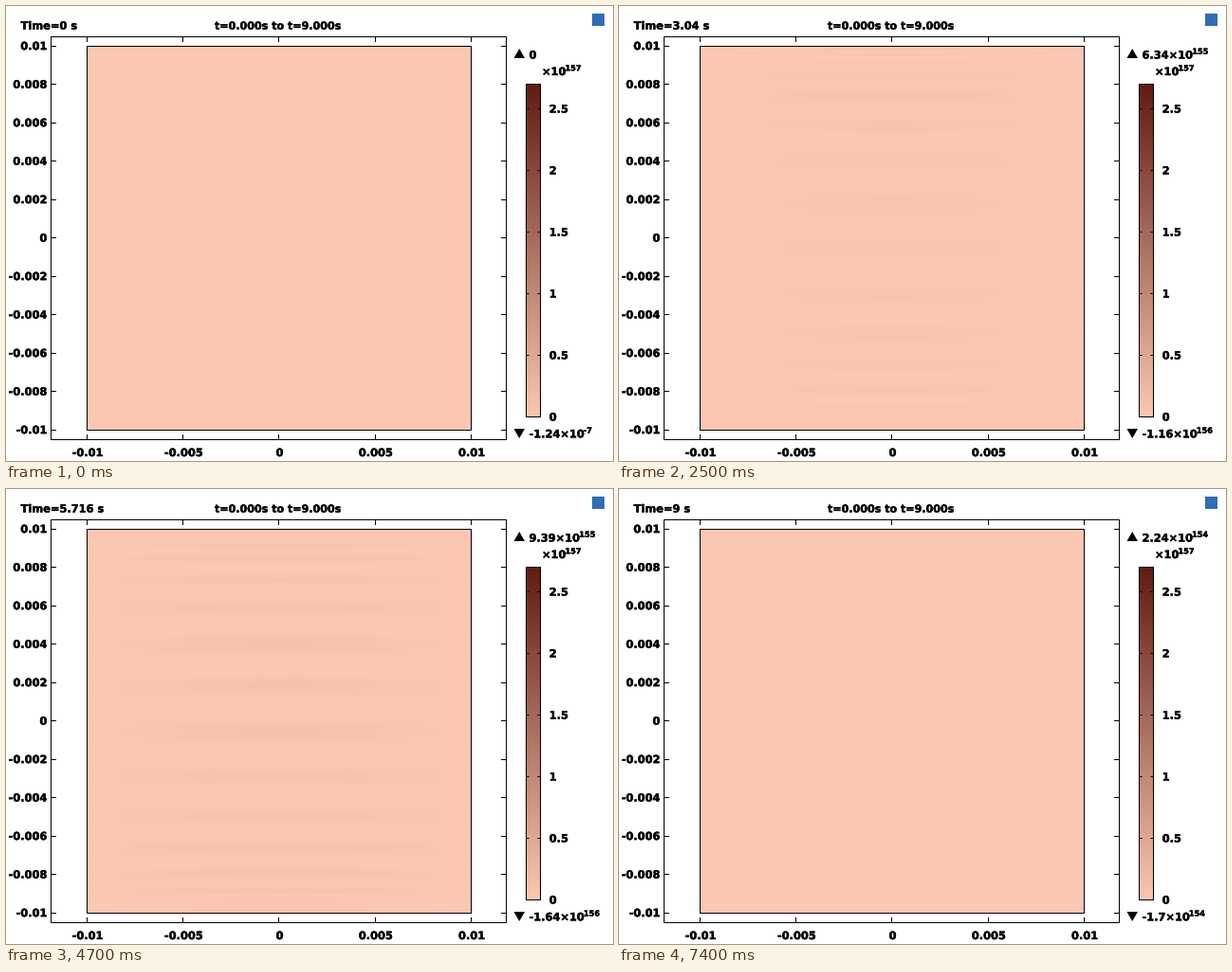
These frames come from a looping animation (640x480 px, 7.5 s). A matplotlib script:

```python
import math

import numpy as np
import matplotlib.pyplot as plt
from matplotlib.animation import FuncAnimation
from matplotlib.colors import LinearSegmentedColormap
from matplotlib.patches import Polygon, Rectangle
from matplotlib.patheffects import withStroke

W, H, DPI = 640, 480, 100
FRAMES, INTERVAL = 75, 100
END_MS = 9000
PX = 72 / DPI
FONT = 11.4
TOP = 2.7                                  # colour range, in 1e157
HEAVY = [withStroke(linewidth=0.3, foreground="black")]

plt.rcParams["font.family"] = "DejaVu Sans"
plt.rcParams["font.weight"] = "bold"

fig = plt.figure(figsize=(W / DPI, H / DPI), dpi=DPI, facecolor="white")
ax = fig.add_axes([0, 0, 1, 1])
ax.axis("off")
cmap = LinearSegmentedColormap.from_list(
    "rust", [(252 / 255, 199 / 255, 178 / 255), (96 / 255, 28 / 255, 16 / 255)], N=1024)

# Plate geometry; lines run through pixel centres
X0, X1, Y0, Y1 = 85.5, 490.5, 42.5, 447.5
side = np.linspace(-1, 1, 406)
u, v = np.meshgrid(side, side)


def text(x, y, s, ha="left", size=FONT):
    return ax.text(x, y, s, ha=ha, va="baseline", fontsize=size * PX, path_effects=HEAVY)


def power(x, y, s="", exp=""):
    """Text with a raised exponent attached to its right end."""
    base = text(x, y, s)
    sup = ax.annotate(exp, xy=(1, 0), xycoords=base, xytext=(-0.8 * PX, 6.8 * PX),
                      textcoords="offset points", fontsize=8.2 * PX, path_effects=HEAVY,
                      ha="left", va="baseline", annotation_clip=False)
    return base, sup


def box(x0, y0, x1, y1, **kw):
    style = dict(fill=False, ec="black", lw=PX, snap=False)
    style.update(kw)
    ax.add_patch(Rectangle((x0, y0), x1 - x0, y1 - y0, **style))


def line(x0, y0, x1, y1):
    ax.plot([x0, x1], [y0, y1], color="black", lw=PX, snap=False, solid_capstyle="butt")


def gradient(data, x0, y0, x1, y1):
    return ax.imshow(data, extent=(x0 - 0.5, x1 + 0.5, y1 + 0.5, y0 - 0.5), cmap=cmap,
                     vmin=0, vmax=TOP, aspect="auto", interpolation="nearest")


def pixel(p):
    return math.ceil(p) - 0.5


def stripes(period, crest, tilt=0):
    """Standing wave in y whose crests crowd together near both edges."""
    s = np.clip(v + tilt * u * np.cos(math.pi * v), -0.995, 0.995)
    depth = (np.arcsin(s) + np.arctanh(s)) / 2
    return (1 - v ** 12) * np.cos(2 * math.pi * (depth - crest) / period)


def spread(width):
    return np.exp(-(u / width) ** 2)


def top_heavy(bias, width):
    return 1 - bias * (1 - np.exp(-((v + 0.75) / width) ** 2))


# Wave modes, each with a peak of about one
FINE, CREST = 0.2365, 0.055
sway = -stripes(0.28, -0.15) * np.sin(math.pi * u)
calm = stripes(FINE, CREST) * spread(0.6) * top_heavy(0.3, 0.2)
surge = -stripes(FINE, CREST, tilt=0.02) * spread(0.6) * top_heavy(0.65, 0.15)
even = stripes(FINE, CREST) * spread(0.65)
broad = stripes(0.46, -0.145) * np.cos(math.pi / 2 * u) * top_heavy(0.5, 0.8)

# Key poses: step, maximum, size of minimum, mode
keys = [
    (1, 1e154, 1e154, sway),
    (13, 8.7e155, 8.9e155, sway),
    (25, 6.34e155, 1.16e156, calm),
    (34, 3.95e156, 2.25e156, surge),
    (47, 9.39e155, 1.64e156, even),
    (56, 1.13e156, 1.11e156, broad),
    (74, 2.24e154, 1.7e154, broad),
]
steps, highs, lows, modes = zip(*keys)


def extreme(i, values):
    return 10 ** np.interp(i, steps, np.log10(values))


def wave(i):
    pos = np.interp(i, steps, np.arange(len(steps)))
    k = min(int(pos), len(steps) - 2)
    f = (1 - math.cos(math.pi * (pos - k))) / 2
    return (1 - f) * modes[k] + f * modes[k + 1]


def scientific(value):
    mant, exp = f"{value:.2e}".split("e")
    return f"{float(mant):g}×10", str(int(exp))


# Plate and axes
plate = gradient(np.zeros_like(u), X0, Y0, X1, Y1)
box(X0, Y0, X1, Y1)
box(47.5, 32.5, 527.5, 457.5)
for n in range(11):
    y = Y0 + n * (Y1 - Y0) / 10
    line(47.5, pixel(y), 53, pixel(y))
    line(522, pixel(y), 527.5, pixel(y))
    text(43.3, y + 3.6, f"{(5 - n) / 500:g}", "right")
for n in range(5):
    x = X0 + n * (X1 - X0) / 4
    line(pixel(x), 32.5, pixel(x), 38)
    line(pixel(x), 452, pixel(x), 457.5)
    text(x + 0.5, 475, f"{(n - 2) / 200:g}", "center")

# Colour bar
BX0, BX1, BY0, BY1 = 548.5, 563.5, 82.5, 433.5
gradient(np.linspace(TOP, 0, 352)[:, None], BX0, BY0, BX1, BY1)
box(BX0, BY0, BX1, BY1)
for n in range(6):
    y = BY1 - n * 0.5 / TOP * (BY1 - BY0)
    line(BX0, pixel(y), BX0 + 3, pixel(y))
    line(BX1 - 3, pixel(y), BX1, pixel(y))
    text(572.7, y + 4, f"{n / 2:g}")
power(565, 73, "×10", "157")
for base, tip in ((55, 45), (446, 456)):
    ax.add_patch(Polygon([(535.5, base), (547, base), (541.2, tip)], fc="black", ec="none"))

box(618, 8, 631, 21, fill=True, fc="#2f6db5", ec="none")
text(220, 24.6, "t=0.000s to t=9.000s", size=11.1)

clock = text(15.6, 24.6, "")
labels = power(551.5, 55.5) + power(551.5, 455.3)

ax.set_xlim(0, W)
ax.set_ylim(H, 0)


def draw(i):
    clock.set_text(f"Time={i * END_MS // (FRAMES - 1) / 1000:g} s")
    if i == 0:
        high, top, bottom = 0, ("0", ""), scientific(-1.24e-7)
    else:
        high = extreme(i, highs)
        top, bottom = scientific(high), scientific(-extreme(i, lows))
    plate.set_data(high / 1e157 * wave(i))
    for label, s in zip(labels, top + bottom):
        label.set_text(s)
    return plate, clock, *labels


anim = FuncAnimation(fig, draw, frames=FRAMES, interval=INTERVAL, repeat=True,
                     repeat_delay=0, blit=False)
plt.show()
```
